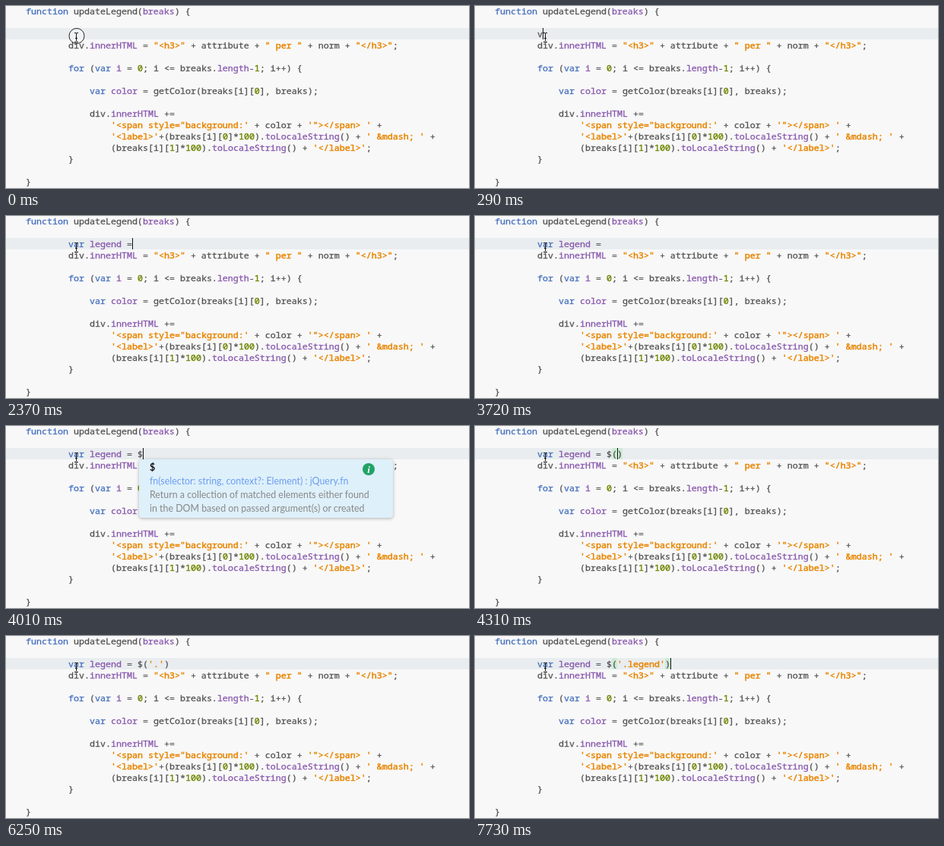
An HTML page for the animation above (8 s loop, 609 by 240 pixels).

```html
<!DOCTYPE html>
<html lang="en">
<head>
<meta charset="utf-8">
<title>Typing a selector</title>
<style>
  html, body { margin: 0; width: 100%; height: 100%; overflow: hidden; background: #f8f8f8; }
  svg { display: block; }
  text { white-space: pre; }
  .code { font: 500 11.667px "Noto Sans Mono", "DejaVu Sans Mono", monospace; color: #535353; }
  .code, .code tspan { fill: currentColor; stroke: currentColor; stroke-width: .3px; }
  .keyword { color: #446fbd; }
  .code .string { color: #e88501; stroke-width: .5px; }
  .name { color: #8757ad; }
  .code .number { color: #6d8600; stroke-width: .4px; }
  .note { font: 12.4px Lato, "Liberation Sans", sans-serif; fill: #888; }
  .panel { fill: #def0fa; filter: drop-shadow(0 1px 2px rgba(0, 0, 0, .3)); }
  .link { fill: #6c9cf2; }
</style>
</head>
<body>
<svg width="609" height="240" viewBox="0 0 609 240">
  <rect width="609" height="240" fill="#f8f8f8"/>
  <rect y="29" width="609" height="15" fill="#e9edef"/>
  <g id="match" fill="#cdebd5">
    <rect id="open" y="29" width="7" height="15"/>
    <rect id="close" y="29" width="7" height="15"/>
  </g>
  <g id="lines"></g>
  <text id="typed" class="code" x="82" y="41"></text>

  <g id="popup">
    <rect class="panel" x="175" y="44" width="334" height="77" rx="4"/>
    <text class="note" x="189" y="59" style="font-weight:700;fill:#111">$</text>
    <circle cx="477" cy="57" r="8" fill="#20a366"/>
    <text x="477" y="62" text-anchor="middle" fill="#fff" style="font:italic 700 13px 'Liberation Serif',serif">i</text>
    <text class="note link" x="189" y="77">fn(selector: string, context?: Element) : jQuery.fn</text>
    <text class="note" x="189" y="95">Return a collection of matched elements either found</text>
    <text class="note" x="189" y="113">in the DOM based on passed argument(s) or created</text>
  </g>

  <g id="tip">
    <rect class="panel" x="180" y="4" width="197" height="22" rx="3"/>
    <text class="note link" x="187" y="19">selector: string, context?: Element</text>
  </g>

  <rect id="caret" y="29" width="1" height="15" fill="#111"/>
  <circle id="click" cx="93" cy="39.5" r="10" fill="#fff" fill-opacity=".35" stroke="#222"/>
  <path d="M90 35.5h2l.5 .5 .5-.5h2M92.5 36v10.500M90 47.500h2l.5-.5 .5.5h2M91 42.500h3" fill="none" stroke="#111"/>
</svg>
<script>
const LOOP = 8000, CHAR = 7;
const $ = id => document.getElementById(id);

// [row, indent, code]
const code = [
  [0, 0, 'function updateLegend(breaks) {'],
  [3, 8, 'div.innerHTML = "<h3>" + attribute + " per " + norm + "</h3>";'],
  [5, 8, 'for (var i = 0; i <= breaks.length-1; i++) {'],
  [7, 12, 'var color = getColor(breaks[i][0], breaks);'],
  [9, 12, 'div.innerHTML +='],
  [10, 16, `'<span style="background:' + color + '"></span> ' +`],
  [11, 16, "'<label>'+(breaks[i][0]*100).toLocaleString() + ' &mdash; ' +"],
  [12, 16, "(breaks[i][1]*100).toLocaleString() + '</label>';"],
  [13, 8, '}'],
  [15, 0, '}']
];

// [time, text, caret column or -1 when blinked off, extras]
const steps = [
  [0, '', -1, 'click'],
  [150, 'v', 1],
  [300, 'va', 2],
  [430, 'var', 3],
  [580, 'var ', 4],
  [880, 'var l', 5],
  [1030, 'var le', 6],
  [1330, 'var leg', 7],
  [1480, 'var legen', 9],
  [1620, 'var legend', 10],
  [1920, 'var legend ', 11],
  [2370, 'var legend =', 12],
  [2820, 'var legend =', -1],
  [3270, 'var legend = ', 13],
  [3720, 'var legend = ', -1],
  [4010, 'var legend = $', 14, 'popup'],
  [4310, 'var legend = $()', 15, 'match'],
  [4460, 'var legend = $()', 15, 'match tip'],
  [4900, 'var legend = $()', -1, 'match tip'],
  [5350, 'var legend = $()', 15, 'match tip'],
  [5500, "var legend = $('')", 16],
  [5650, "var legend = $('.')", 17],
  [6250, "var legend = $('.')", -1],
  [6400, "var legend = $('.l')", 18],
  [6550, "var legend = $('.le')", 19],
  [6700, "var legend = $('.leg')", 20],
  [6840, "var legend = $('.legen')", 22],
  [6990, "var legend = $('.legend')", 23],
  [7590, "var legend = $('.legend')", 24, 'match'],
  [7730, "var legend = $('.legend')", 25, 'match']
];

const token = /(?<string>"[^"]*"|'[^']*')|(?<keyword>\b(?:function|var|for)\b)|(?<name>(?<=var |\.|function \w+\()[a-z]\w*)|(?<number>\b\d+)/gi;

function svg(tag, attrs, parent) {
  const el = document.createElementNS('http://www.w3.org/2000/svg', tag);
  for (const key in attrs) el.setAttribute(key, attrs[key]);
  return parent.appendChild(el);
}

function highlight(el, line) {
  el.textContent = '';
  let end = 0;
  for (const m of line.matchAll(token)) {
    el.append(line.slice(end, m.index));
    const kind = Object.keys(m.groups).find(k => m.groups[k]);
    svg('tspan', { class: kind }, el).textContent = m[0];
    end = m.index + m[0].length;
  }
  el.append(line.slice(end));
}

for (const [row, indent, line] of code) {
  const attrs = { class: 'code', x: 26 + indent * CHAR, y: 11 + row * 15 };
  highlight(svg('text', attrs, $('lines')), line);
}

const show = (id, on) => { $(id).style.display = on ? '' : 'none'; };
const column = n => 82 + n * CHAR;
let current;

function draw(now) {
  const t = now % LOOP;
  const step = steps.findLast(s => s[0] <= t);
  if (step !== current) {
    current = step;
    const [, text, caret, extras = ''] = step;
    highlight($('typed'), text);
    show('caret', caret >= 0);
    $('caret').setAttribute('x', column(Math.max(caret, 0)));
    $('open').setAttribute('x', column(text.indexOf('(')));
    $('close').setAttribute('x', column(text.indexOf(')')));
    for (const id of ['click', 'popup', 'tip', 'match']) show(id, extras.includes(id));
  }
}

const start = performance.now();
function tick() {
  draw(performance.now() - start);
  requestAnimationFrame(tick);
}
tick();
</script>
</body>
</html>
```
